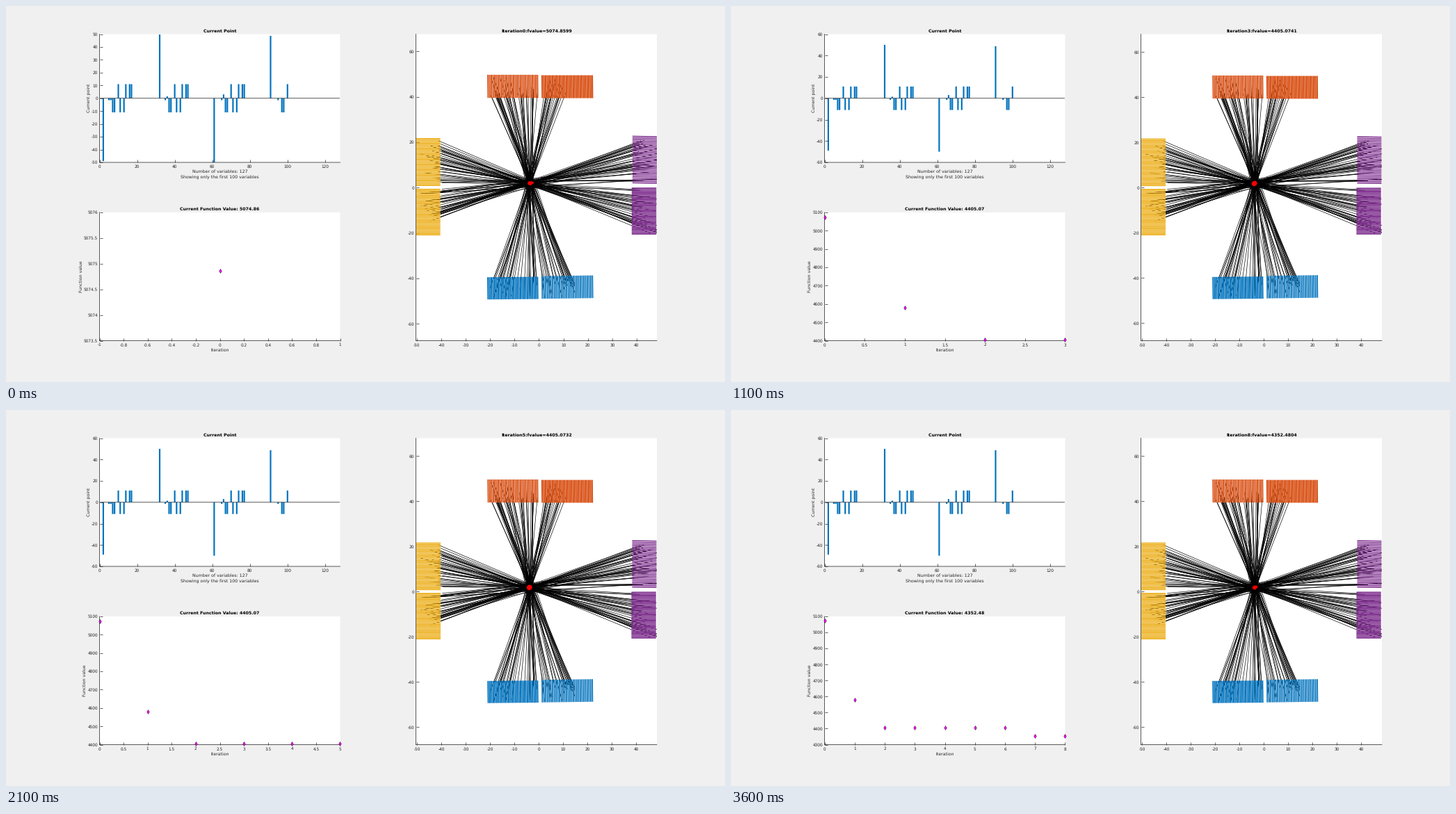
Recreate the animation shown at these times as a matplotlib script. Size 1034x541 px, loop 4600 ms.

```python
import numpy as np
import matplotlib.pyplot as plt
from matplotlib.animation import FuncAnimation
from matplotlib.collections import LineCollection
from matplotlib.ticker import MaxNLocator

W, H, DPI = 1034, 541, 100
PT = 72 / DPI  # points per pixel
INK = "#262626"
ORANGE, BLUE, YELLOW, PURPLE = "#D95319", "#0072BD", "#EDB120", "#7E2F8E"

plt.rcParams.update({
    "font.family": "DejaVu Sans",
    "axes.unicode_minus": False,
    "text.hinting": "none",
    "path.simplify": False,
})

VALUES = [5074.8599, 4578.4345, 4405.1109, 4405.0741] + 3 * [4405.0732] + 2 * [4352.4804]
LAST = len(VALUES) - 1

fig = plt.figure(figsize=(W / DPI, H / DPI), dpi=DPI, facecolor="#F0F0F0")


def panel(left, top, right, bottom, ylabel=""):
    ax = fig.add_axes([left / W, 1 - bottom / H,
                       (right - left) / W, (bottom - top) / H])
    ax.patch.set_snap(False)
    ax.spines[["top", "right"]].set_visible(False)
    for side in ("left", "bottom"):
        ax.spines[side].set(color=INK, linewidth=0.75 * PT, snap=False)
    ax.tick_params(direction="in", length=3.6 * PT, width=0.7 * PT,
                   color=INK, labelcolor=INK, labelsize=5.75 * PT)
    ax.tick_params(axis="x", pad=3.4 * PT)
    ax.tick_params(axis="y", pad=2.4 * PT)
    for axis in (ax.xaxis, ax.yaxis):
        axis.set_major_locator(MaxNLocator(nbins=11, steps=[1, 2, 5, 10]))
        axis.set_major_formatter(lambda v, _: f"{round(v, 6) + 0.0:g}")
    ax.set_ylabel(ylabel, fontsize=6.25 * PT, color=INK, labelpad=1 * PT)
    return ax


def label(x, y, text="", bold=False):
    return fig.text(x / W, 1 - y / H, text, ha="center", va="baseline",
                    fontsize=6.25 * PT, color="black" if bold else INK,
                    weight="bold" if bold else "normal")


bars_ax = panel(134.5, 40.5, 480.5, 225, "Current point")
fit_ax = panel(134.5, 297, 480.5, 481.5, "Function value")
rays_ax = panel(589.5, 40.5, 936, 481.5)

# Bars: the same pattern repeats every 30 variables
point = np.zeros(130)
for start, small in zip(range(1, 92, 30), (-1.5, 1.5, 3, 0)):
    point[start + 4], point[start + 5] = -1.5, small
    for offset in (6, 7, 10, 12):
        point[start + offset] = -11
    for offset in (9, 13, 15, 16):
        point[start + offset] = 11
for index, value in {2: -49, 32: 50, 61: -50, 91: 48.7}.items():
    point[index] = value

bars_ax.bar(np.arange(101), point[:101], width=0.8, color=BLUE, snap=False)
bars_ax.axhline(0, color=INK, lw=0.75 * PT, snap=False)
bars_ax.set_xlim(0, 128)
label(307.5, 38, "Current Point", bold=True)
label(307.5, 240.2, "Number of variables: 127")
label(307.5, 247.6, "Showing only the first 100 variables")

history, = fit_ax.plot([], [], "d", ms=4.2 * PT, mfc="magenta", mec="#301030",
                       mew=0.5 * PT, clip_on=False, zorder=5)
fit_title = label(307.5, 294.2, bold=True)
label(307.5, 496.6, "Iteration")

# Detector blocks and the rays between them
rng = np.random.RandomState(7)
CENTER_X, CENTER_Y = -3.7, 2.0


def stripes(first, last, color, width):
    """Fill a block with lines running from segment first to segment last."""
    t = np.linspace(0, 1, 30)[:, None, None]
    segments = np.array(first) * (1 - t) + np.array(last) * t
    rays_ax.add_collection(LineCollection(
        segments, colors=color, linewidths=width * PT, zorder=2, snap=False),
        autolim=False)


def upright(x0, x1, low, high, color, width, lean=0.1, rise=0.0):
    stripes([(x0, high), (x0 + lean, low)],
            [(x1, high + rise), (x1 + lean, low + rise)], color, width)


def flat(x0, x1, low, high, color, width, drop=0.0):
    stripes([(x0, low), (x1, low - drop)],
            [(x0, high), (x1, high - drop)], color, width)


upright(-20.9, -0.6, 39.5, 49.7, ORANGE, 1.95)
upright(1.3, 21.8, 39.4, 49.5, ORANGE, 2.25)
upright(-20.9, -0.6, -49.3, -39.5, BLUE, 2.0, rise=0.2)
upright(1.3, 21.9, -49.0, -39.0, BLUE, 1.75, rise=0.3)
flat(-50.4, -40.4, 1.0, 21.5, YELLOW, 1.85)
flat(-50.4, -40.4, -20.8, -0.8, YELLOW, 1.85)
flat(38.3, 48.3, 2.1, 22.6, PURPLE, 1.5, drop=0.2)
flat(38.0, 48.1, -20.4, -0.3, PURPLE, 1.95)


def hits(v):
    """True where a block, not the slit between two blocks, is reached."""
    return -20.6 < v < 22 and not -0.6 < v < 1.5


def fan(count, edge, along, across, slope_range):
    """Random lines near the centre that end inside two facing blocks."""
    lines = []
    while len(lines) < count:
        slope = rng.uniform(*slope_range)
        offset = across + rng.normal(0, 0.75)
        depth = np.minimum(rng.exponential(4, 2), 9)
        ends = np.array([-edge - depth[0], edge + depth[1]])
        values = offset + slope * (ends - along)
        if hits(values[0]) and hits(values[1]):
            lines.append(np.column_stack([ends, values]))
    return np.array(lines)


sideways = fan(88, 39.5, CENTER_X, CENTER_Y, (-0.48, 0.42))
vertical = fan(66, 39.5, CENTER_Y, CENTER_X, (-0.42, 0.37))[:, :, ::-1]
rays_ax.add_collection(LineCollection(
    np.concatenate([sideways, vertical]), colors="black",
    linewidths=0.65 * PT, zorder=1), autolim=False)

# Red points: first iteration reached, centre x, spread, size in pixels
STAGES = [(0, -3.5, 0.5, 3.0), (1, -3.8, 0.5, 1.0),
          (2, -4.0, 0.15, 5.6), (7, -3.8, 0.35, 3.6)]
scatter = np.random.RandomState(3).normal(0, 1, (2, 12))
sources, = rays_ax.plot([], [], "o", color="red", mew=0, zorder=4)
rays_title = label(763, 38, bold=True)


def draw(frame):
    k = 0 if frame == 0 else min(1 + (frame - 1) // 5, LAST)
    first = k == 0

    top = 50 if first else 60
    bars_ax.set_ylim(-top, top)

    fit_ax.set_xlim(*((-1, 1) if first else (0, k)))
    fit_ax.set_ylim(*((5073.5, 5076) if first else (VALUES[k] // 100 * 100, 5100)))
    history.set_data(range(k + 1), VALUES[:k + 1])
    fit_title.set_text(f"Current Function Value: {VALUES[k]:g}")

    rays_ax.set_xlim(*((-50.4, 48.3) if first else (-50.55, 48.45)))
    rays_ax.set_ylim(*((-67.45, 67.6) if first else (-67.7, 68)))
    _, x, spread, size = [s for s in STAGES if s[0] <= k][-1]
    sources.set_data(x + spread * scatter[0], CENTER_Y + 0.7 * spread * scatter[1])
    sources.set_markersize(size * PT)
    rays_title.set_text(f"Iteration{k}:fvalue={VALUES[k]:.4f}")


anim = FuncAnimation(fig, draw, frames=46, interval=100,
                     init_func=lambda: draw(0), repeat=True, repeat_delay=0)
plt.show()
```
